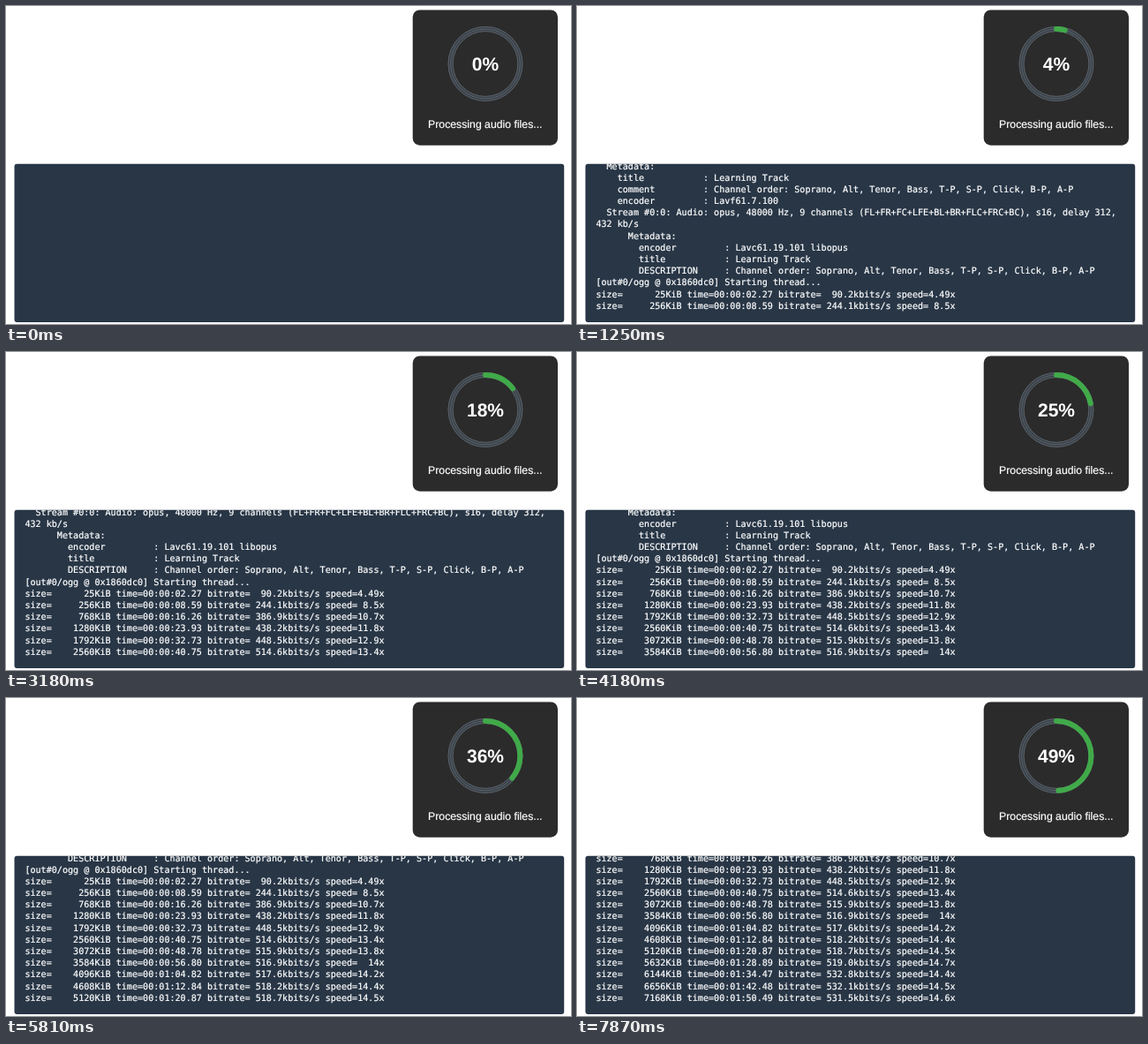
Write an HTML page that moves like this. It is 640 px wide and 360 px high and loops after 8 s.

```html
<!DOCTYPE html>
<html lang="en">
<head>
<meta charset="utf-8">
<title>Audio processing</title>
<style>
  html, body { margin: 0; width: 100%; height: 100%; overflow: hidden; background: #fff; }
  svg { display: block; width: 640px; height: 360px; }
  text { white-space: pre; text-rendering: geometricPrecision; }
  .label { font-family: "Liberation Sans", Arial, sans-serif; fill: #fff; text-anchor: middle; }
  .caption { font-size: 12.25px; stroke: #fff; stroke-width: 0.2; }
  #log { font: 10.1px "DejaVu Sans Mono", Menlo, monospace; fill: #fff; stroke: #fff; stroke-width: 0.22; }
  .ring circle { fill: none; }
</style>
</head>
<body>
<svg viewBox="0 0 640 360">
  <clipPath id="screen"><rect x="9.5" y="178.7" width="622.7" height="179.3" rx="3"/></clipPath>
  <rect x="460.7" y="4.5" width="164.3" height="153.2" rx="8" fill="#2b2b2b"/>
  <g class="ring" transform="translate(543 65.5) rotate(-90)">
    <circle r="39.4" stroke="#3a4149" stroke-width="6"/>
    <g stroke="#5e666e" stroke-width="0.9">
      <circle r="42"/><circle r="39.4"/><circle r="36.9"/>
    </g>
    <circle id="arc" r="39.4" stroke="#40aa49" stroke-width="6" stroke-linecap="round" pathLength="100"/>
  </g>
  <text id="percent" class="label" x="543" y="73" font-size="21" font-weight="bold"></text>
  <text class="label caption" x="542.8" y="137.6">Processing audio files...</text>
  <rect x="9.5" y="178.7" width="622.7" height="179.3" rx="3" fill="#283646"/>
  <g id="log" clip-path="url(#screen)"></g>
</svg>
<script>
const LOOP = 8000, FRAME = 62.5;
const PITCH = 13.18, FIRST_LINE = 200, LAST_LINE = 342.7;
const UPDATES = 15, FIRST_UPDATE = 636, UPDATE_GAP = 505.5, RING_MS = 113;
const TRACK_SECONDS = 226;
const $ = id => document.getElementById(id);

const channels = "(FL+FR+FC+LFE+BL+BR+FLC+FRC+BC)";
const order = "Channel order: Soprano, Alt, Tenor, Bass, T-P, S-P, Click, B-P, A-P";
const field = (indent, key, value) => " ".repeat(indent) + key.padEnd(16) + ": " + value;
const inputs = Array.from({ length: 6 }, (_, i) => `in${i}:mono + `).join("");

const header = [
  `[Parsed_amerge_9 @ 0x1860dc0] ${inputs}in`,
  `6:mono + in7:mono + in8:mono -> out:9 channels ${channels}`,
  "Output #0, ogg, to 'output.opus':",
  "  Metadata:",
  field(4, "title", "Learning Track"),
  field(4, "comment", order),
  field(4, "encoder", "Lavf61.7.100"),
  `  Stream #0:0: Audio: opus, 48000 Hz, 9 channels ${channels}, s16, delay 312,`,
  "432 kb/s",
  "      Metadata:",
  field(8, "encoder", "Lavc61.19.101 libopus"),
  field(8, "title", "Learning Track"),
  field(8, "DESCRIPTION", order),
  "[out#0/ogg @ 0x1860dc0] Starting thread..."
];

// Seconds encoded at a few updates; steady progress in between.
const pace = [[0, 2.27], [1, 8.59], [3, 23.93], [4, 32.73], [11, 88.89], [12, 94.47], [14, 110.49]];
function encodedSeconds(k) {
  const i = Math.max(1, pace.findIndex(([at]) => at >= k));
  const [[k0, s0], [k1, s1]] = [pace[i - 1], pace[i]];
  return s0 + (s1 - s0) * (k - k0) / (k1 - k0);
}

const clock = s => `00:0${Math.floor(s / 60)}:${(s % 60).toFixed(2).padStart(5, "0")}`;

// The file is flushed in 256 KiB blocks; bitrate and speed follow from size and time.
function statLine(k) {
  const secs = encodedSeconds(k);
  const size = Math.max(25, 256 * Math.floor(2.05 * k - 0.22));
  const rate = (size * 8.192 / secs).toFixed(1);
  const speed = String(Number((secs * 1000 / (UPDATE_GAP * (k + 1))).toPrecision(3)));
  return `size=${String(size).padStart(8)}KiB time=${clock(secs)} ` +
    `bitrate=${rate.padStart(6)}kbits/s speed=${speed.padStart(4)}x`;
}

const percentAt = k => k < 0 ? 0 : Math.round(encodedSeconds(k) / TRACK_SECONDS * 100);
const smooth = x => x * x * (3 - 2 * x);

const lines = [...header, ...Array.from({ length: UPDATES }, (_, k) => statLine(k))];
const rows = lines.map(line => {
  const row = document.createElementNS("http://www.w3.org/2000/svg", "text");
  row.setAttribute("x", 21.4);
  row.textContent = line.replace(/ /g, "\u00a0");
  $("log").append(row);
  return row;
});

function draw(time) {
  // Sixteen pictures per second, their times cut to hundredths.
  const frame = Math.floor((Math.floor(time / 10) * 10 + 9) / FRAME);
  const t = frame * FRAME;
  const k = Math.min(UPDATES - 1, Math.floor((t - FIRST_UPDATE) / UPDATE_GAP));
  const updates = Math.max(0, k + 1);

  const shown = Math.min(header.length, Math.ceil(frame * 3.5)) + updates;
  rows.forEach((row, i) => {
    row.style.display = i < shown ? "" : "none";
    row.setAttribute("y", Math.min(FIRST_LINE + i * PITCH, LAST_LINE - (shown - 1 - i) * PITCH));
  });

  const now = percentAt(k), before = percentAt(k - 1);
  const elapsed = t - FIRST_UPDATE - k * UPDATE_GAP;
  const arc = before + (now - before) * smooth(Math.min(1, elapsed / RING_MS));
  $("percent").textContent = now + "%";
  $("arc").style.display = arc > 0 ? "" : "none";
  $("arc").setAttribute("stroke-dasharray", `${arc} 200`);
}

const start = performance.now();
function tick() {
  draw((performance.now() - start) % LOOP);
  requestAnimationFrame(tick);
}
tick();
</script>
</body>
</html>
```
